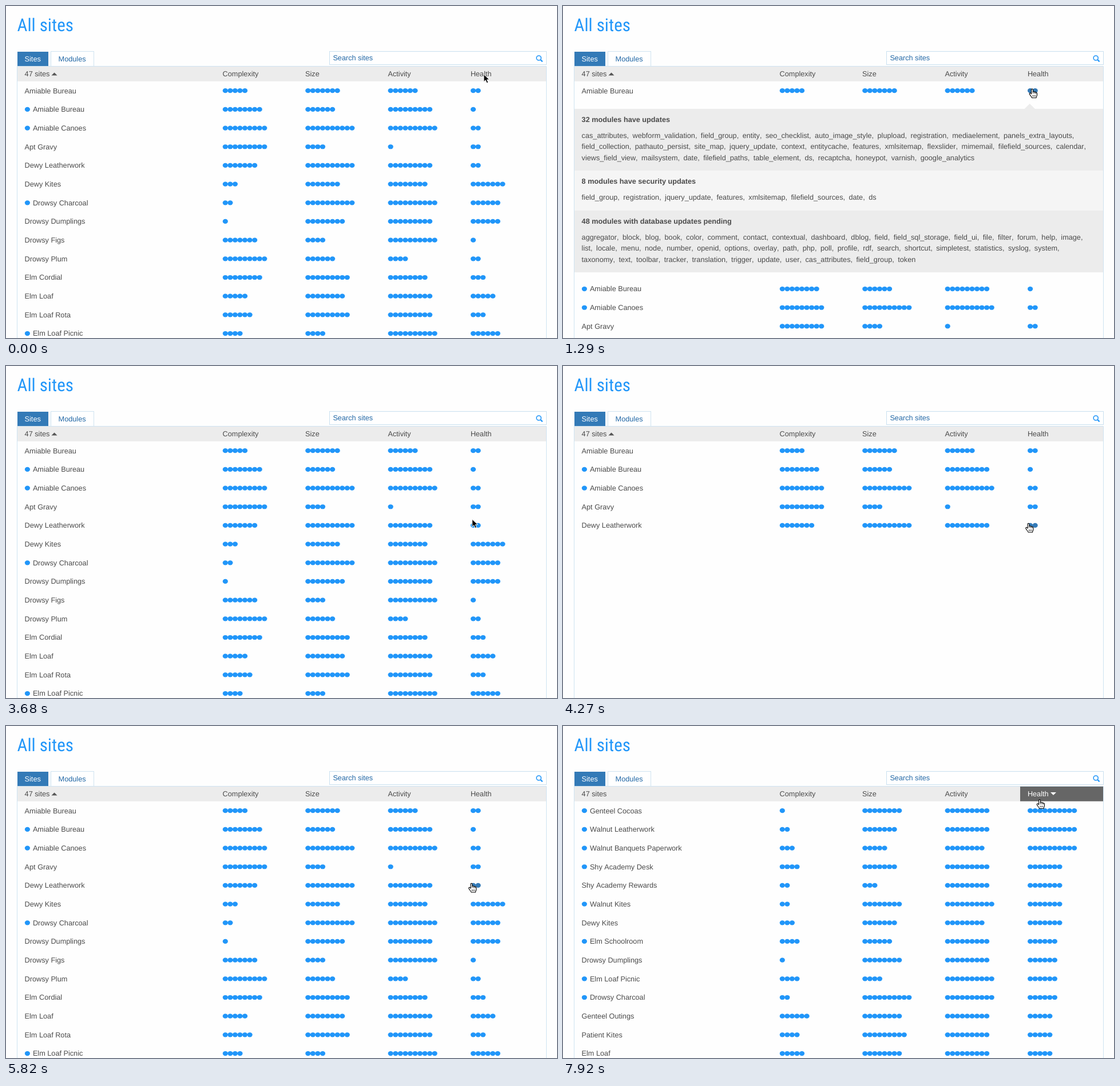
Write an HTML page that moves like this. It is 963 px wide and 581 px high and loops after 8000 ms.

```html
<!DOCTYPE html>
<html lang="en">
<head>
<meta charset="utf-8">
<title>All sites</title>
<style>
  html, body { margin: 0; width: 100%; height: 100%; overflow: hidden; background: #fefefe; }
  svg { display: block; width: 100%; height: 100%; }
  text { font: 12.7px "Liberation Sans", Arial, sans-serif; font-kerning: none; fill: #4b4b4b; text-rendering: geometricPrecision; }
  .title { font: 400 31px "Roboto Condensed", "Roboto", sans-serif; font-stretch: 75%; fill: #2196f9; }
  .bold { font-weight: 700; }
  .list { word-spacing: 2.94px; }
  .link { fill: #2368a6; }
  .white { fill: #fff; }
</style>
</head>
<body>
<svg id="stage" viewBox="0 0 963 581" preserveAspectRatio="none">
  <rect width="963" height="581" fill="#fefefe"/>
  <text class="title" x="19.5" y="44">All sites</text>
  <rect x="20" y="80" width="54" height="26" fill="#337ab7"/>
  <rect x="78.5" y="79.5" width="75" height="27" fill="#fff" stroke="#cfe3f1"/>
  <text class="white" x="32.6" y="97">Sites</text>
  <text class="link" x="91.6" y="97">Modules</text>
  <rect x="565.5" y="79.5" width="379" height="23" fill="#fff" stroke="#c9e0f0"/>
  <text class="link" x="571.4" y="95.3">Search sites</text>
  <g fill="none" stroke="#2196f9">
    <circle cx="931.2" cy="91" r="4" stroke-width="1.6"/>
    <path d="M934.2 94l3.4 3.4" stroke-width="2.2"/>
  </g>
  <path d="M19.5 581V105.5H944.5V581" fill="none" stroke="#cfe3f1"/>
  <rect x="20" y="106" width="924" height="25.7" fill="#ececec"/>
  <g id="view"></g>
  <g id="cursor"></g>
</svg>
<script>
const LOOP = 8000, BLUE = '#2196f9', DARK = '#337ab7';
const COLS = [383.3, 527.8, 672.2, 816.6];
const TOP = 148.2, PITCH = 32.68, LINE = 19.05;

// Leading * marks a bullet; the hex digits are complexity, size, activity, health.
const sites = `Amiable Bureau 5762
*Amiable Bureau 8691
*Amiable Canoes 9aa2
Apt Gravy 9412
Dewy Leatherwork 7a92
Dewy Kites 3787
*Drowsy Charcoal 2aa6
Drowsy Dumplings 1896
Drowsy Figs 74a1
Drowsy Plum 9642
Elm Cordial 8983
Elm Loaf 5895
Elm Loaf Rota 6993
*Elm Loaf Picnic 44a6
*Genteel Cocoas 189a
*Walnut Leatherwork 279a
*Walnut Banquets Paperwork 358a
*Shy Academy Desk 4797
Shy Academy Rewards 2397
*Walnut Kites 28a7
*Elm Schoolroom 4696
Genteel Outings 6895
Patient Kites 4995`.split('\n').map(row => {
  const [, bullet, name, digits] = row.match(/^(\*?)(.+) (\w{4})$/);
  return { bullet, name, scores: [...digits].map(d => parseInt(d, 16)) };
});
const byName = sites.slice(0, 14);
const ascending = [...sites].sort((a, b) => a.scores[3] - b.scores[3]).slice(0, 14);
const descending = [14, 15, 16, 17, 18, 19, 5, 20, 7, 13, 6, 21, 22, 11].map(i => sites[i]);

const core = [
  'aggregator, block, blog, book, color, comment, contact, contextual, dashboard, dblog, field, field_sql_storage, field_ui, file, filter, forum, help, image,',
  'list, locale, menu, node, number, openid, options, overlay, path, php, poll, profile, rdf, search, shortcut, simpletest, statistics, syslog, system,',
  'taxonomy, text, toolbar, tracker, translation, trigger, update, user, cas_attributes, field_group, token'
];
const firstPanel = [
  ['32 modules have updates',
    'cas_attributes, webform_validation, field_group, entity, seo_checklist, auto_image_style, plupload, registration, mediaelement, panels_extra_layouts,',
    'field_collection, pathauto_persist, site_map, jquery_update, context, entitycache, features, xmlsitemap, flexslider, mimemail, filefield_sources, calendar,',
    'views_field_view, mailsystem, date, filefield_paths, table_element, ds, recaptcha, honeypot, varnish, google_analytics'],
  ['8 modules have security updates',
    'field_group, registration, jquery_update, features, xmlsitemap, filefield_sources, date, ds'],
  ['48 modules with database updates pending', ...core]
];
const secondPanel = [
  ['45 modules have updates',
    'views, captcha, webform, auto_image_style, spamspan, phone, media, checklistapi, transliteration, field_collection_table, registration, link,',
    'hierarchical_select, site_map, memcache, google_analytics, mimemail, flexslider, filefield_paths, plupload, devel, seo_checklist, webform_validation,',
    'config_perms, libraries, context, xmlsitemap, views_accordion, metatag, field_collection, ds, table_element, varnish, mediaelement, field_group,',
    'colorbox, calendar, wysiwyg_codemagic, options_element, panels_extra_layouts, mailsystem, date, entitycache, node_clone, jquery_update'],
  ['8 modules have security updates',
    'media, registration, xmlsitemap, ds, field_group, colorbox, date, jquery_update'],
  ['49 modules with database updates pending', ...core]
];

const text = (x, y, s, cls = '') => `<text class="${cls}" x="${x}" y="${y}">${s}</text>`;
const rect = (x, y, w, h, fill) => `<rect x="${x}" y="${y}" width="${w}" height="${h}" fill="${fill}"/>`;
const dot = (x, y, fill) => `<ellipse cx="${x}" cy="${y}" rx="4.6" ry="4.1" fill="${fill}"/>`;
const triangle = (x, up, fill) =>
  `<path d="M${x - 5} ${up ? 121.5 : 116}h10l-5 ${up ? -5 : 5}z" fill="${fill}"/>`;

const onDots = (p, y) => p.x > 811 && p.x < 830 && Math.abs(p.y - y) < 5;

function siteRow(site, y, p) {
  const hover = onDots(p, y);
  let out = site.bullet ? dot(37.4, y, BLUE) : '';
  out += text(site.bullet ? 46.9 : 32.6, y + 4.4, site.name);
  site.scores.forEach((n, c) => {
    for (let i = 0; i < n; i++) out += dot(COLS[c] + i * 8.56, y, c === 3 && hover ? DARK : BLUE);
  });
  return out;
}

function panel(sections, y, showText) {
  let out = `<path d="M806 ${y + .5}l9.7 -9.5l9.7 9.5z" fill="#ececec"/>`;
  sections.forEach(([head, ...lines], i) => {
    const h = 50.9 + LINE * lines.length;
    out += rect(20, y, 924, h, i % 2 ? '#f5f5f5' : '#ececec');
    if (showText) {
      out += text(32.6, y + 23.4, head, 'bold');
      lines.forEach((s, k) => out += text(32.6, y + 51.4 + k * LINE, s, 'list'));
    }
    y += h;
  });
  return [out, y];
}

function header(sort, hover) {
  return (hover ? rect(799, 106, 145, 25.7, '#666') : '') +
    text(32.6, 123.4, '47 sites') +
    ['Complexity', 'Size', 'Activity', 'Health'].map((s, i) =>
      text(COLS[i] - 4.7, 123.4, s, i === 3 && hover ? 'white' : '')).join('') +
    (sort ? triangle(857, sort > 0, '#fff') : triangle(84.5, true, '#555'));
}

// Pointer moves: start, step length, steps, target x and y.
const moves = [
  [60, 70, 4, 820, 145.3],
  [3050, 66, 6, 816, 261],
  [3680, 60, 2, 813.5, 275.5],
  [5940, 56, 6, 833, 119],
  [7920, 1, 1, 833, 129]
];
function pointer(t) {
  const p = { x: 835, y: 119.5 };
  for (const [start, step, n, x, y] of moves) {
    if (t < start) break;
    const k = Math.min(n, Math.floor((t - start) / step) + 1) / n;
    p.x += (x - p.x) * k;
    p.y += (y - p.y) * k;
  }
  return p;
}

const ARROW = '<path d="M0 0V13.2L3.1 10.3L5.3 15.3L7.8 14.2L5.6 9.4H9.8Z" fill="#000" stroke="#fff" stroke-width="1"/>';
const HAND = '<path d="M-1.4 8.6V1.2C-1.4 -.6 1.3 -.6 1.4 1.2V5.2C1.8 4 4 4.2 4 5.6C4.6 4.6 6.4 5 6.4 6.4C7 5.6 8.5 6.1 8.5 7.4V10.2C8.5 12 7.2 13 7 15.5H-.4C-.8 13.4 -3 12 -4.7 8.8C-5.4 7.2 -3.6 6.4 -2.6 7.4Z" fill="#fff" stroke="#000" stroke-width="1.1" stroke-linejoin="round"/><path d="M1.4 5.2V8M4 5.8V8.2M6.4 6.6V8.6M1 10.6V13.4M3.2 10.6V13.4M5.4 10.6V13.4" stroke="#000" stroke-width=".8"/>';

function scene(t, p) {
  const sort = t < 6580 ? 0 : t < 7590 ? 1 : -1;
  const rows = [byName, ascending, descending].at(sort);
  const first = t >= 870 && t < 2750, second = t >= 4270 && t < 5820;
  const openRow = first ? 0 : second ? 4 : -1;
  let out = header(sort, t > 5900 && p.y < 132), y = TOP;
  for (let i = 0; i < rows.length && y < 590; i++) {
    out += siteRow(rows[i], y, p);
    if (i === openRow) {
      if (t >= 4270 && t < 4330) break;
      const [markup, end] = panel(first ? firstPanel : secondPanel, y + 31.8, t >= (first ? 1290 : 4750));
      out += markup;
      y = end + 29;
    } else y += PITCH;
  }
  return out;
}

const shown = {};
function put(id, markup) {
  if (shown[id] === markup) return;
  document.getElementById(id).innerHTML = shown[id] = markup;
}

function render(t) {
  const p = pointer(t);
  const overRow = byName.some((_, i) => onDots(p, TOP + i * PITCH));
  put('view', scene(t, p));
  put('cursor', `<g transform="translate(${p.x} ${p.y})">${overRow || t >= 6400 ? HAND : ARROW}</g>`);
}

const began = performance.now();
function tick() {
  render((performance.now() - began) % LOOP);
  requestAnimationFrame(tick);
}
tick();
</script>
</body>
</html>
```
